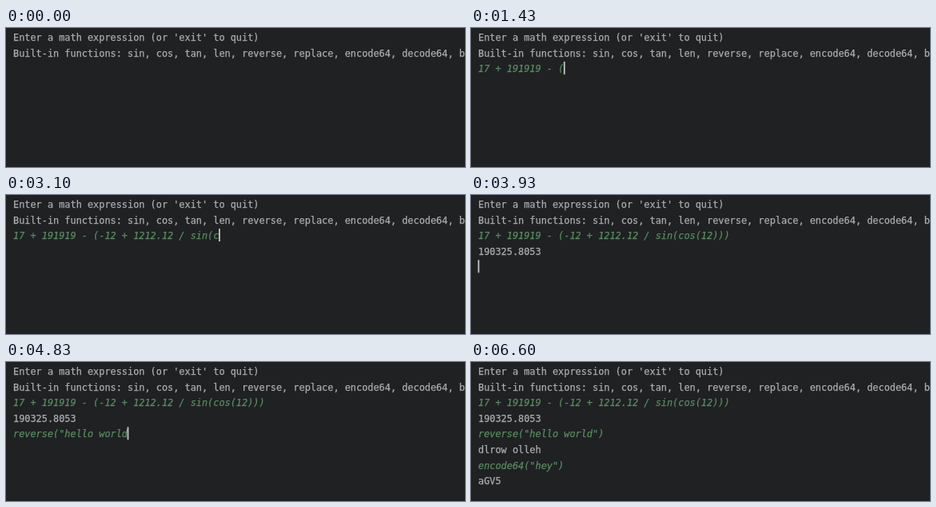
Recreate the animation shown at these times as an HTML page with a canvas. Size 574 px wide and 174 px high, loop 6.67 s.

```html
<!DOCTYPE html>
<html lang="en">
<head>
<meta charset="utf-8">
<title>Console calculator</title>
<style>
  html, body { margin: 0; width: 100%; height: 100%; overflow: hidden; background: #1f2123; }
  canvas { display: block; width: 574px; height: 174px; }
</style>
</head>
<body>
<canvas id="stage"></canvas>
<script>
const W = 574, H = 174, LOOP = 6670;
const LEFT = 9, COL = 7.15, ROW = 19.6, BASE = 16, CARET_TOP = 2.9;
const BACK = '#1f2123', PLAIN = '#abadb0', TYPED = '#578d60', CARET = '#c4c6c9';
const FAMILY = '"DejaVu Sans Mono", "Noto Sans Mono", monospace';
const SIZE = COL / 0.602;
const CARET_ON = 30, FADE_START = 6430, FADE_END = 6600;

const intro = [
  "Enter a math expression (or 'exit' to quit)",
  'Built-in functions: sin, cos, tan, len, reverse, replace, encode64, decode64, b'
];

// Each burst is typed at an even pace: text, time of first key, time of last key.
const entries = [
  {
    bursts: [
      ['17 ', 130, 270], ['+ 1', 470, 630], ['91919 '.padStart(6), 800, 970],
      ['- (', 1230, 1430], ['-12 ', 1630, 1870], ['+ 1', 2030, 2100],
      ['212.1', 2200, 2300], ['2 ', 2500, 2570], ['/ sin(', 2870, 2870],
      ['cos(12))', 3100, 3500], [')', 3700, 3700]
    ],
    output: '190325.8053',
    enter: 3930
  },
  {
    bursts: [['reverse("hello w', 4100, 4700], ['orld', 4770, 4830], ['")', 4900, 4900]],
    output: 'dlrow olleh',
    enter: 5070
  },
  {
    bursts: [['encode64', 5230, 5530], ['(', 5730, 5730], ['"hey")', 5870, 6130]],
    output: 'aGV5',
    enter: 6270
  }
];

const canvas = document.getElementById('stage');
const ctx = canvas.getContext('2d');
const scale = window.devicePixelRatio || 1;
canvas.width = W * scale;
canvas.height = H * scale;

function typedText(bursts, t) {
  const shown = ([text, first, last]) => [...text].filter((ch, i) =>
    t >= first + (last - first) * i / Math.max(text.length - 1, 1)).join('');
  return bursts.map(shown).join('');
}

function write(text, row, typed) {
  ctx.font = `${typed ? 'italic ' : ''}${SIZE}px ${FAMILY}`;
  ctx.fillStyle = ctx.strokeStyle = typed ? TYPED : PLAIN;
  ctx.lineWidth = 0.25;
  [...text].forEach((ch, i) => {
    const x = LEFT + i * COL, y = BASE + row * ROW;
    ctx.fillText(ch, x, y);
    ctx.strokeText(ch, x, y);
  });
}

function caretAlpha(t) {
  if (t < CARET_ON) return 0;
  return Math.min(1, Math.max(0, (FADE_END - t) / (FADE_END - FADE_START)));
}

function drawCaret(col, row, alpha) {
  ctx.globalAlpha = alpha;
  ctx.fillStyle = CARET;
  ctx.fillRect(LEFT + col * COL - 0.4, CARET_TOP + row * ROW, 1.8, 16);
  ctx.globalAlpha = 1;
}

function draw(t) {
  ctx.setTransform(scale, 0, 0, scale, 0, 0);
  ctx.fillStyle = BACK;
  ctx.fillRect(0, 0, W, H);
  intro.forEach((line, i) => write(line, i, false));

  let row = intro.length, col = 0;
  for (const { bursts, output, enter } of entries) {
    const text = typedText(bursts, t);
    write(text, row, true);
    col = text.length;
    if (t < enter) break;
    write(output, row + 1, false);
    row += 2;
    col = 0;
  }
  drawCaret(col, row, caretAlpha(t));
}

const start = performance.now();
function tick() {
  draw((performance.now() - start) % LOOP);
  requestAnimationFrame(tick);
}
tick();
</script>
</body>
</html>
```
